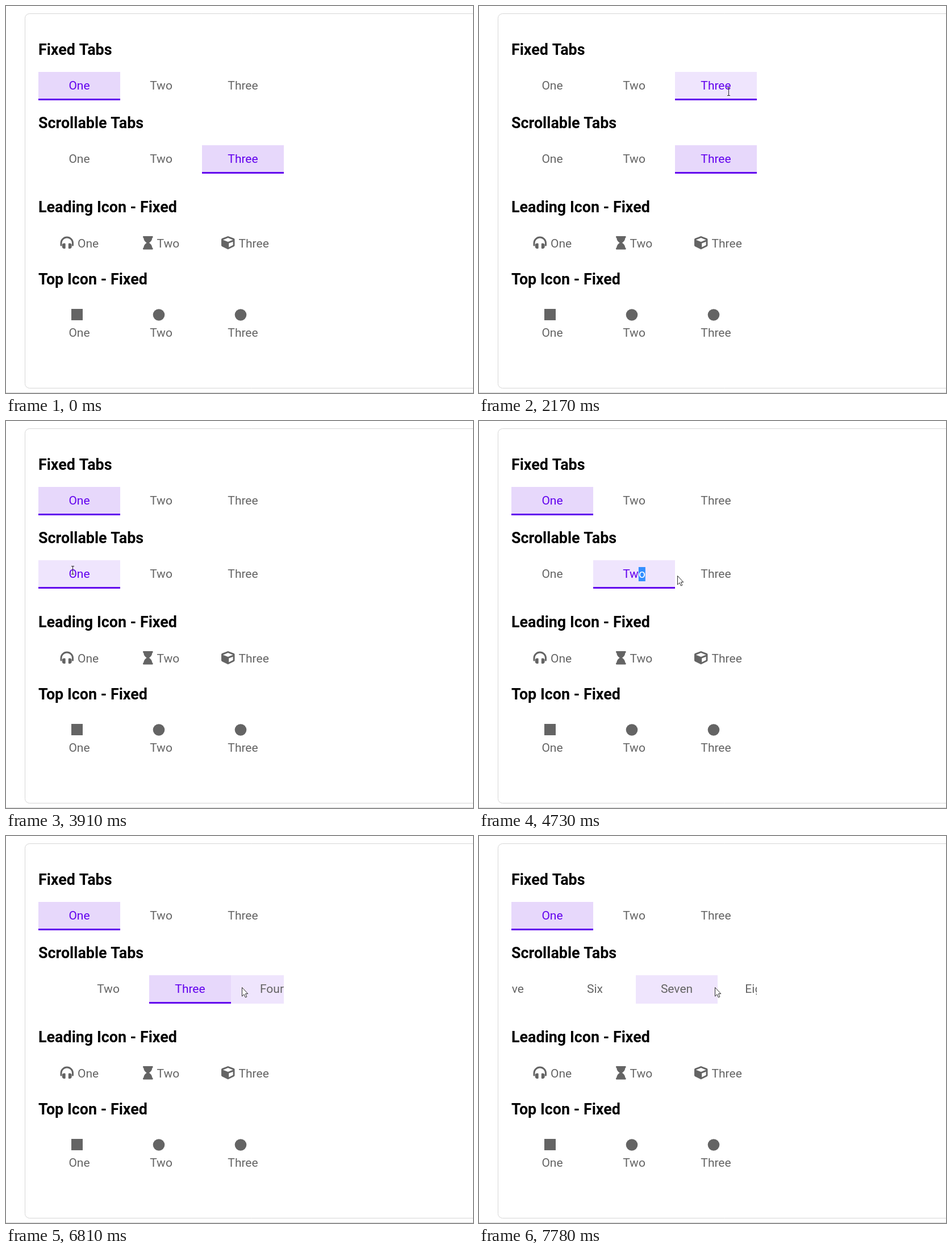
Write an HTML page with a canvas that moves like this. It is 822x681 px and loops after 8 s.

```html
<!DOCTYPE html>
<html lang="en">
<head>
<meta charset="utf-8">
<title>Tabs</title>
<style>
html, body { margin: 0; width: 100%; height: 100%; overflow: hidden; background: #fff; }
canvas { display: block; width: 822px; height: 681px; }
</style>
</head>
<body>
<canvas id="stage"></canvas>
<script>
const W = 822, H = 681, LOOP = 8000, STEP = 70, FLASH = 140;
const LEFT = 57, RIGHT = 489, TAB = 144, TAB_H = 50, BAR = 3;
const GREY = '#646464', ACCENT = '#6200ee', FOCUS = '#e7d8fb', HOVER = '#efe5fd';
const LABELS = ['One', 'Two', 'Three', 'Four', 'Five', 'Six', 'Seven', 'Eight'];
const ROW_Y = [116, 245];
const FONT = '400 21px Roboto, sans-serif';

// each move ends at "to"; some end in a press on a tab
const MOVES = [
  { from: 310, to: 650, pos: [109, 60] },
  { from: 650, to: 790, pos: [145, 22] },
  { from: 1060, to: 1130, pos: [248, 113] },
  { from: 1400, to: 1600, pos: [275, 145], press: { row: 0, tab: 1 } },
  { from: 1670, to: 1880, pos: [450, 150], press: { row: 0, tab: 2 } },
  { from: 2170, to: 2730, pos: [62, 157] },
  { from: 2920, to: 2930, pos: [60, 157], press: { row: 0, tab: 0 } },
  { from: 3070, to: 3440, pos: [105, 262], press: { row: 1, tab: 0 } },
  { from: 3910, to: 4340, pos: [283, 268], press: { row: 1, tab: 1, drag: true } },
  { from: 4410, to: 4730, pos: [349, 272] },
  { from: 4800, to: 5010, pos: [415, 266], press: { row: 1, tab: 2 } }
];
const SCROLLS = [
  { from: 6010, to: 6140, pos: [54] },
  { from: 6340, to: 6480, pos: [79] },
  { from: 6810, to: 7300, pos: [404] },
  { from: 7570, to: 7780, pos: [645] }
];

const canvas = document.getElementById('stage');
const dpr = window.devicePixelRatio || 1;
canvas.width = W * dpr;
canvas.height = H * dpr;
const c = canvas.getContext('2d');

const GLASS = new Path2D('M24 32C24 160 90 220 145 256 90 292 24 352 24 480H360C360 352 294 292 239 256 294 220 360 160 360 32z');
const CUBE = new Path2D('M256 2L490 88 512 120V360L490 394 256 508 22 394 0 360V120L22 88zM256 68L448 140 256 219 64 140zM288 424V275L448 210V344z');
const ARROW = new Path2D('M0.5 0.5V16L4 12.6 6.4 18 8.8 17 6.5 11.6H10.8z');

// eased position along a chain of moves, refreshed every STEP ms
function follow(moves, start, t) {
  let pos = start;
  for (const m of moves) {
    if (t < m.from) break;
    const gaps = Math.max(1, Math.round((m.to - m.from) / STEP));
    const done = Math.floor((t - m.from) / (m.to - m.from) * gaps + 1e-6) + 1;
    const k = Math.min(1, done / (gaps + 1));
    const ease = k * k * (3 - 2 * k);
    pos = pos.map((v, i) => v + (m.pos[i] - v) * ease);
  }
  return pos;
}

function text(str, x, y, color = GREY, align = 'left') {
  c.font = FONT;
  c.textAlign = align;
  c.fillStyle = color;
  c.fillText(str, x, y);
}

function heading(str, y) {
  c.font = '700 26.9px Roboto, sans-serif';
  c.textAlign = 'left';
  c.fillStyle = '#000';
  c.fillText(str, LEFT, y);
}

function disc(x, y, r, color) {
  c.fillStyle = color;
  c.beginPath();
  c.arc(x, y, r, 0, Math.PI * 2);
  c.fill();
}

function icon(x, y, paint) {
  c.save();
  c.translate(x, y);
  c.scale(23.5 / 512, 23.5 / 512);
  c.fillStyle = c.strokeStyle = GREY;
  paint();
  c.restore();
}

function headphones() {
  c.lineWidth = 66;
  c.lineCap = 'round';
  c.beginPath();
  c.moveTo(33, 350);
  c.lineTo(33, 266);
  c.arc(256, 266, 223, Math.PI, 0);
  c.lineTo(479, 350);
  c.stroke();
  c.beginPath();
  c.roundRect(72, 274, 128, 206, [80, 30, 30, 80]);
  c.roundRect(312, 274, 128, 206, [30, 80, 80, 30]);
  c.fill();
}

function hourglass() {
  c.fill(GLASS);
  c.beginPath();
  c.roundRect(0, 0, 384, 64, 24);
  c.roundRect(0, 448, 384, 64, 24);
  c.fill();
}

function page() {
  c.fillStyle = '#fff';
  c.fillRect(0, 0, W, H);
  c.strokeStyle = '#d6d6d6';
  c.lineWidth = 1;
  c.beginPath();
  c.roundRect(33.5, 13.5, W, 659, 8);
  c.moveTo(0, 680.5);
  c.lineTo(W, 680.5);
  c.stroke();
  heading('Fixed Tabs', 86);
  heading('Scrollable Tabs', 215);
  heading('Leading Icon - Fixed', 363);
  heading('Top Icon - Fixed', 490);
}

function iconRows() {
  icon(95.5, 405, headphones);
  icon(241, 405, hourglass);
  icon(379, 405, () => c.fill(CUBE, 'evenodd'));
  [126, 265.5, 409.5].forEach((x, i) => text(LABELS[i], x, 425));

  c.fillStyle = GREY;
  c.fillRect(115, 533, 20, 20);
  disc(269, 543.5, 10.3, GREY);
  disc(413, 543.5, 10.3, GREY);
  for (let i = 0; i < 3; i++) text(LABELS[i], LEFT + TAB * (i + 0.5), 582, GREY, 'center');
}

function tabRow(row, count, selected, hovered, offset, marked) {
  const y = ROW_Y[row];
  c.save();
  c.beginPath();
  c.rect(LEFT, y, RIGHT - LEFT, TAB_H);
  c.clip();
  for (let i = 0; i < count; i++) {
    const x = Math.round(LEFT + i * TAB - offset), on = i === selected;
    if (on || i === hovered) {
      c.fillStyle = i === hovered ? HOVER : FOCUS;
      c.fillRect(x, y, TAB, TAB_H);
    }
    if (on) {
      c.fillStyle = ACCENT;
      c.fillRect(x, y + TAB_H - BAR, TAB, BAR);
    }
    text(LABELS[i], x + TAB / 2, y + 31, on ? ACCENT : GREY, 'center');
    if (marked && on) markLast(LABELS[i], x + TAB / 2, y);
  }
  c.restore();
}

// text selection over the last letter of a centred label
function markLast(label, mid, y) {
  const end = mid + c.measureText(label).width / 2;
  const x = end - c.measureText(label.slice(-1)).width;
  c.fillStyle = '#338fff';
  c.fillRect(x, y + 12, end - x, 25);
  text(label.slice(-1), x, y + 31, '#fff');
}

function hoverTab(row, x, y, offset) {
  const inside = x >= LEFT && x < RIGHT && y >= ROW_Y[row] && y < ROW_Y[row] + TAB_H;
  return inside ? Math.floor((x - LEFT + offset) / TAB) : -1;
}

function overLabel(row, i, x, y, offset) {
  if (i < 0) return false;
  c.font = FONT;
  const mid = LEFT + (i + 0.5) * TAB - offset;
  return Math.abs(x - mid) < c.measureText(LABELS[i]).width / 2 &&
    Math.abs(y - ROW_Y[row] - TAB_H / 2) < 12;
}

function pointer(x, y, beam) {
  c.save();
  c.translate(Math.round(x), Math.round(y));
  c.lineWidth = 1;
  c.strokeStyle = '#2b2b2b';
  if (beam) {
    c.strokeRect(2.5, -6.5, 0, 14);
    c.strokeRect(0, -6.5, 5, 0);
    c.strokeRect(0, 7.5, 5, 0);
  } else {
    c.fillStyle = '#fff';
    c.fill(ARROW);
    c.stroke(ARROW);
  }
  c.restore();
}

function draw(t) {
  const [x, y] = follow(MOVES, [556, 618], t);
  const [offset] = follow(SCROLLS, [0], t);
  const visible = t >= MOVES[0].from;
  const shift = [0, offset];
  const selected = [0, 2];
  let last = null;
  for (const m of MOVES) {
    if (!m.press || t < m.to) continue;
    selected[m.press.row] = m.press.tab;
    last = m;
  }
  const dragging = last !== null && Boolean(last.press.drag);
  const hover = shift.map((s, r) => visible ? hoverTab(r, x, y, s) : -1);
  if (dragging) hover[last.press.row] = last.press.tab;

  c.setTransform(dpr, 0, 0, dpr, 0, 0);
  page();
  tabRow(0, 3, selected[0], hover[0], 0, false);
  tabRow(1, LABELS.length, selected[1], hover[1], offset, dragging && t > last.to + FLASH);
  iconRows();

  if (!visible) return;
  if (last && t - last.to < FLASH) disc(x - 1, y, 13.5, 'rgba(255, 250, 80, 0.75)');
  pointer(x, y, shift.some((s, r) => overLabel(r, hover[r], x, y, s)));
}

let origin = null;
function tick(now) {
  if (origin === null) origin = now;
  draw((now - origin) % LOOP);
  requestAnimationFrame(tick);
}
draw(0);
requestAnimationFrame(tick);
</script>
</body>
</html>
```
